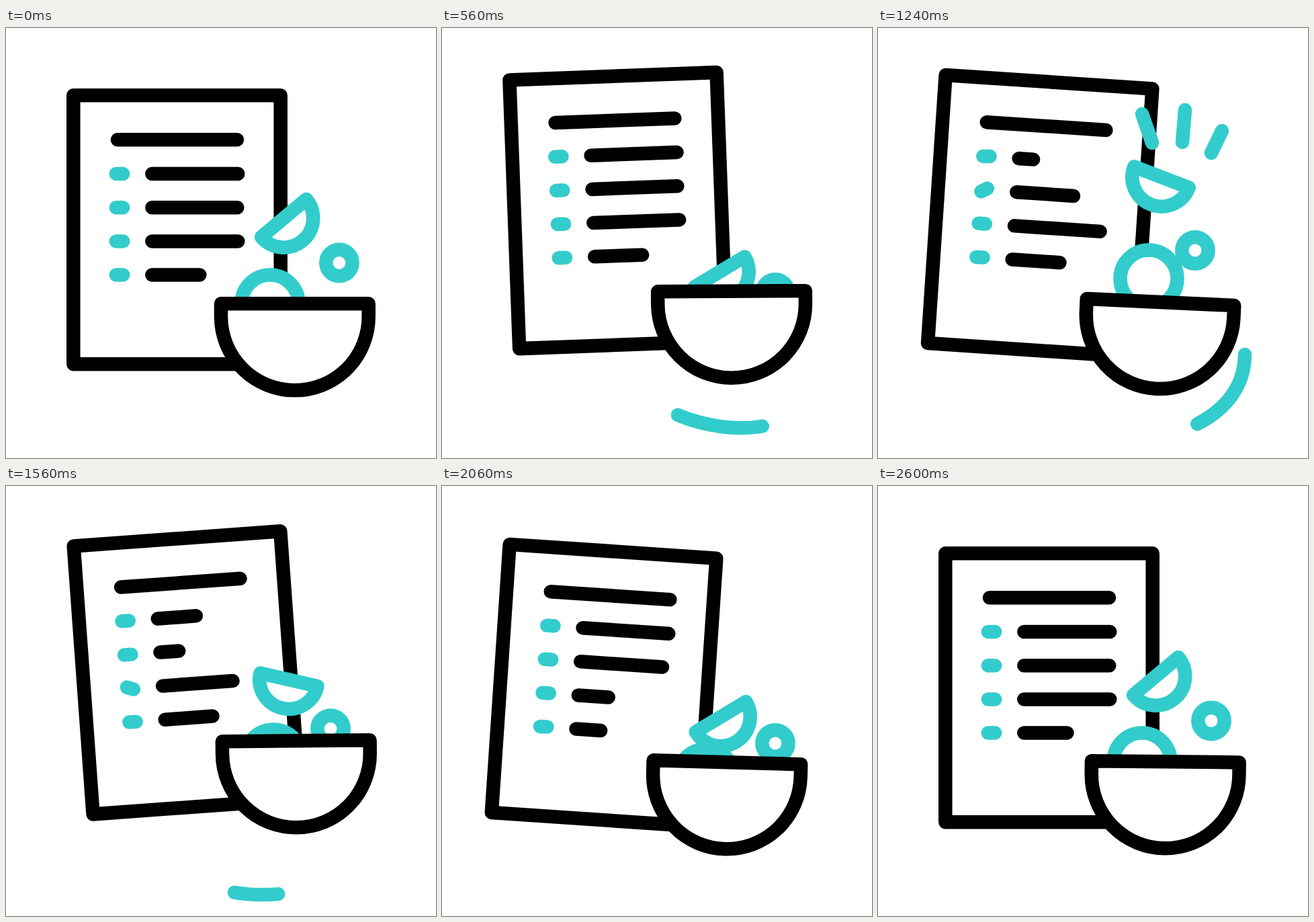
An HTML page that plays this animation: 640x640 px, repeating every 2.62 s.

```html
<!DOCTYPE html>
<html lang="en">
<head>
<meta charset="utf-8">
<title>Recipe</title>
<style>
  html, body { margin: 0; width: 100%; height: 100%; overflow: hidden; background: #fff; }
  svg { display: block; width: 100vw; height: 100vh; }
  .ink, .teal { fill: #fff; stroke: #000; stroke-width: 20.5; stroke-linecap: round; stroke-linejoin: round; }
  .teal { stroke: #3cc; }
  .open { fill: none; }
</style>
</head>
<body>
<svg viewBox="0 0 640 640">
  <g id="page">
    <rect class="ink" x="100.3" y="100.3" width="308.4" height="400"/>
    <path class="ink" d="M166 166.3H344"/>
    <g id="rows"></g>
  </g>
  <g id="ticks">
    <path class="teal open" pathLength="1" d="M408 171L393 128"/>
    <path class="teal open" pathLength="1" d="M453 170L457 122"/>
    <path class="teal open" pathLength="1" d="M496 186L512 153"/>
  </g>
  <circle id="big" class="teal" r="42.5"/>
  <circle id="small" class="teal" r="19.7"/>
  <path id="slice" class="teal" d="M-43.7 0H43.7A43.7 43.7 0 0 1 -43.7 0Z"/>
  <path id="bowl" class="ink" d="M320 410.3H539.7V429.5A109.85 109.85 0 0 1 320 429.5Z"/>
  <path id="swingRight" class="teal open" pathLength="1"
    d="M351 576C392 593 438 599 475 593C508 588 532 575 550 557C566 541 575 524 578 506"/>
  <path id="swingLeft" class="teal open" pathLength="1"
    d="M546 486C546 532 518 568 474 590C452 600 432 605 410 607C385 609 362 609 340 605"/>
</svg>
<script>
const LOOP = 2620;
const $ = id => document.getElementById(id);
const clamp = u => Math.min(1, Math.max(0, u));
const ramp = (t, a, b) => clamp((t - a) / (b - a));
const smooth = u => u * u * (3 - 2 * u);
const easeOut = u => 1 - (1 - u) ** 1.75;

// Monotone cubic curve through the given times and values.
function curve(times, values) {
  const last = times.length - 1;
  const slope = i => (values[i + 1] - values[i]) / (times[i + 1] - times[i]);
  const tangent = times.map((_, i) => {
    if (i === 0 || i === last) return 0;
    const a = slope(i - 1), b = slope(i);
    return a * b > 0 ? 2 * a * b / (a + b) : 0;
  });
  return t => {
    if (t <= times[0]) return values[0];
    if (t >= times[last]) return values[last];
    let i = 0;
    while (t > times[i + 1]) i++;
    const h = times[i + 1] - times[i], u = (t - times[i]) / h;
    const s = smooth(u);
    return values[i] * (1 - s) + values[i + 1] * s
      + h * u * (1 - u) * ((1 - u) * tangent[i] - u * tangent[i + 1]);
  };
}

const page = {
  turn: curve([160, 560, 820, 860, 1190, 1240, 1570, 2000, 2060, 2300, 2600],
              [0, -2.1, -4.1, -4, 4.1, 3.82, -4.15, 4.1, 3.85, 2.4, 0]),
  lift: curve([160, 560, 610, 680, 860, 920, 1240, 1410, 1560, 1780, 2060, 2600],
              [0, -28.5, -29.5, -26, -5, -2, -20, -30, -22, 0, -3, 0])
};

const bowl = {
  turn: curve([160, 350, 560, 840, 860, 1240, 1340, 1560, 1775, 2060, 2320, 2600, 2620],
              [0, 3, -.3, -4.9, -4.7, 2.6, 3.6, -.5, -5.2, 1.5, 4.8, .6, 0]),
  lift: curve([160, 560, 720, 860, 1200, 1240, 1560, 1610, 1900, 2060, 2300, 2600],
              [0, -18.5, -30, -25.3, -1, -2, -31, -32, 0, 1, 1.3, 0])
};

const toss = values => curve([160, 560, 660, 860, 1240, 1560, 1860, 2060, 2600], values);
const slice = {
  x: toss([413.5, 413, 414, 417, 422, 421, 416, 415, 413.5]),
  y: toss([283, 363, 366, 342, 222, 288, 352, 343.5, 283]),
  turn: toss([-40, -31, -30, -25, 21, 13, -22, -31, -40])
};
const small = {
  x: toss([496, 496, 495, 491, 472, 483, 495, 496, 496]),
  y: toss([349.5, 394, 397, 385, 331, 361, 388, 383, 349.5])
};
const big = {
  x: toss([393, 393, 393, 396, 403, 398, 394, 393, 393]),
  y: toss([410, 438, 442, 438, 373, 405, 438, 434, 410])
};

function add(tag, attrs) {
  const el = document.createElementNS("http://www.w3.org/2000/svg", tag);
  for (const k in attrs) el.setAttribute(k, attrs[k]);
  return $("rows").appendChild(el);
}

const rows = [
  [128, curve([860, 1240, 1320, 1560, 1860], [1, .17, .1, .445, 1])],
  [127, curve([1090, 1240, 1560, 1600, 2060, 2120], [1, .67, .22, .19, .96, 1])],
  [128, curve([1430, 1560, 1880, 2060, 2420], [1, .82, .1, .35, 1])],
  [71, curve([1740, 2060, 2230, 2600, 2620], [1, .52, .1, .9, 1])]
].map(([width, fill], i) => {
  const y = 217 + 50.2 * i;
  return {
    y, width, fill, start: 730 + 270 * i,
    dot: add("path", { class: "teal", d: `M163.8 ${y}h10.4` }),
    bar: add("path", { class: "ink" })
  };
});

const place = (id, x, y, turn = 0) =>
  $(id).setAttribute("transform", `translate(${x} ${y}) rotate(${turn})`);

function trim(el, tail, head) {
  el.style.display = head > 0 && tail < 1 ? "" : "none";
  el.setAttribute("stroke-dasharray", `${Math.max(.001, head - tail)} 3`);
  el.setAttribute("stroke-dashoffset", -tail);
}

function draw(t) {
  $("page").setAttribute("transform",
    `translate(0 ${page.lift(t)}) rotate(${page.turn(t)} 254.7 100.3)`);
  for (const r of rows) {
    const spin = 360 * smooth(ramp(t, r.start, r.start + 540));
    r.dot.setAttribute("transform", `rotate(${spin} 169 ${r.y})`);
    r.bar.setAttribute("d", `M217.3 ${r.y}h${r.width * r.fill(t)}`);
  }
  place("big", big.x(t), big.y(t));
  place("small", small.x(t), small.y(t));
  place("slice", slice.x(t), slice.y(t), slice.turn(t));
  $("bowl").setAttribute("transform",
    `translate(0 ${bowl.lift(t)}) rotate(${bowl.turn(t)} 430 205)`);
  trim($("swingRight"), easeOut(ramp(t, 600, 1050)), ramp(t, 390, 750));
  trim($("swingLeft"), easeOut(ramp(t, 1300, 1770)), ramp(t, 1065, 1425));
  for (const el of $("ticks").children)
    trim(el, ramp(t, 1260, 1400), ramp(t, 1120, 1240));
}

const begin = performance.now();
function frame() {
  draw((performance.now() - begin) % LOOP);
  requestAnimationFrame(frame);
}
draw(0);
requestAnimationFrame(frame);
</script>
</body>
</html>
```
